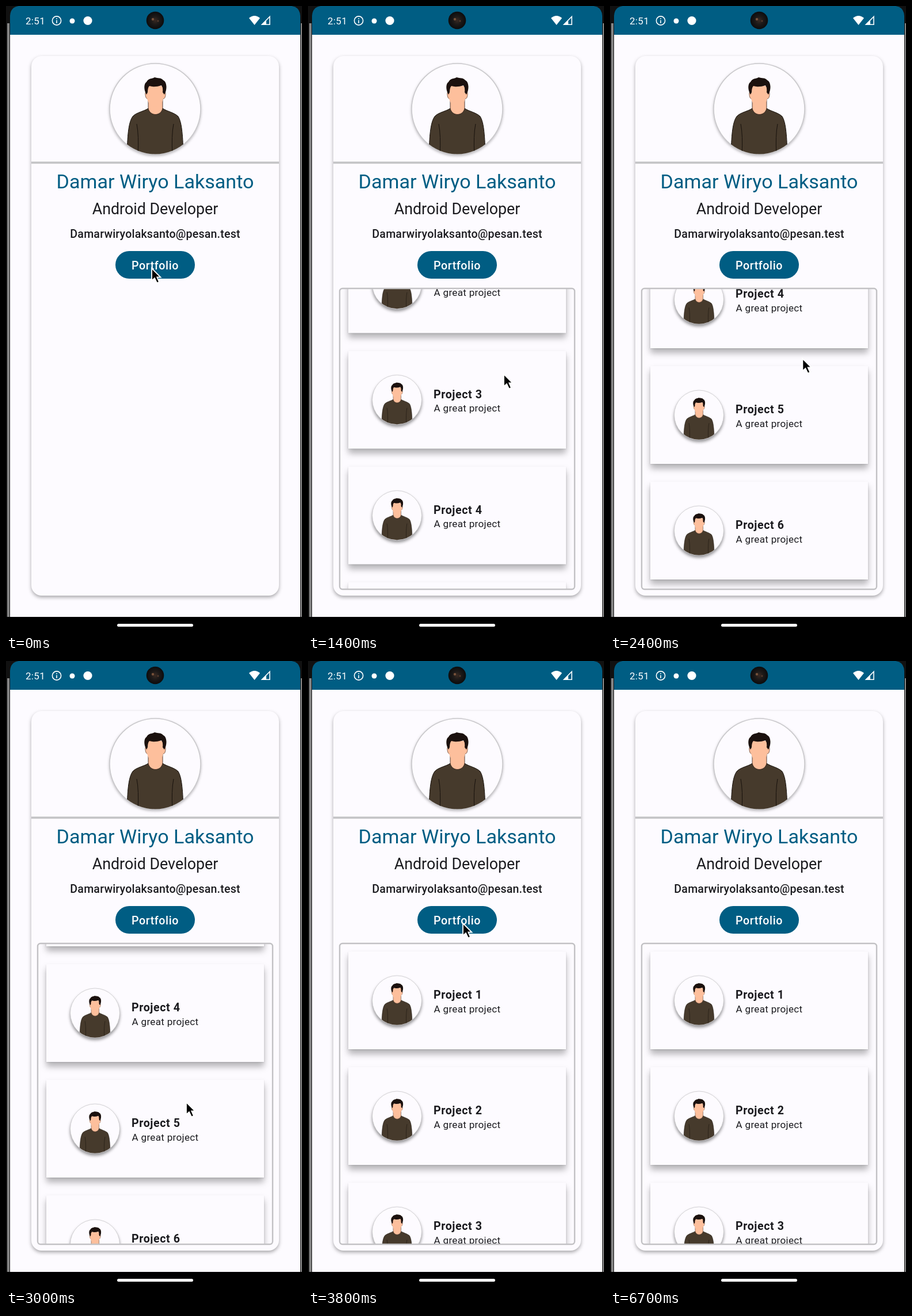
Recreate the animation shown at these times as an HTML page. Size 514x1090 px, loop 6800 ms.

```html
<!DOCTYPE html>
<html lang="en">
<head>
<meta charset="utf-8">
<title>Business card app</title>
<style>
  html, body { margin: 0; width: 100%; height: 100%; overflow: hidden; background: #000; }
  svg { display: block; width: 514px; height: 1090px; }
  text { font-family: Roboto, sans-serif; fill: #1b1b1f; }
  .mid { text-anchor: middle; }
  .name { font-size: 34.1px; fill: #005d83; }
  .role { font-size: 26.8px; }
  .mail { font-size: 19.6px; font-weight: 500; letter-spacing: .18px; }
  .label { font-size: 19.6px; font-weight: 500; letter-spacing: .6px; fill: #fff; }
  .title { font-size: 19.6px; font-weight: 700; letter-spacing: .6px; }
  .note { font-size: 17.1px; letter-spacing: .3px; }
  .clock { font-size: 17px; letter-spacing: .3px; fill: #fff; }
  .paper { fill: #fdfbff; }
  .card { filter: drop-shadow(0 3px 3px #0005); }
  .item { filter: drop-shadow(0 8px 6px #0004) drop-shadow(0 1px 1px #0002); }
  .disc { fill: #fdfbff; stroke: #c9c8cb; stroke-width: 1.5; filter: drop-shadow(0 2px 2px #0004); }
  .small .disc { filter: drop-shadow(0 7px 5px #0006); }
  .icon { fill: none; stroke: #fff; stroke-width: 1.6; }
</style>
</head>
<body>
<svg viewBox="0 0 514 1090">
  <defs>
    <clipPath id="round"><circle r="78.5"/></clipPath>
    <clipPath id="port"><rect x="56" y="492" width="406" height="521" rx="4"/></clipPath>
    <radialGradient id="lens">
      <stop offset="0" stop-color="#3a2a22"/>
      <stop offset=".45" stop-color="#1d1a19"/>
      <stop offset="1" stop-color="#0c0c0d"/>
    </radialGradient>
    <g id="person" clip-path="url(#round)" stroke-linejoin="round">
      <path fill="#463a2c" stroke="#17110c" d="M-49 80C-48 50-47 24-39 13C-33 6-19 4-12-1L13-1C20 4 33 6 40 13C47 24 48 50 49 80Z"/>
      <path fill="#fdbf9c" stroke="#2a1a12" stroke-width=".8" d="M-12-18V-1C-9 13 10 13 13-1V-18Z"/>
      <path fill="none" stroke="#17110c" d="M-32 26Q-28 46-30 80M32 26Q28 46 30 80"/>
      <path fill="#fdbf9c" stroke="#5a3828" stroke-width=".7" d="M-14-30Q-18-31-17-24Q-16-17-13-18M14-30Q19-31 18-24Q17-17 14-18"/>
      <path fill="#fdbf9c" d="M-14-40H14V-19C13-10 7-4 0-4C-7-4-13-10-14-19Z"/>
      <path fill="#1b110e" d="M-15-25C-20-33-20-44-15-47C-11-54-5-52-1-55C5-53 10-55 14-50C21-47 21-33 16-25L13-29Q14-37 11-41Q-1-37-10-40Q-13-37-13-29Z"/>
    </g>
  </defs>

  <!-- device frame and screen -->
  <rect width="514" height="1090" fill="#111"/>
  <path fill="#858585" d="M2 30H6V1068H2ZM512 30H514V1068H512Z"/>
  <rect class="paper" x="7" y="40" width="504" height="1022"/>
  <path fill="#005d83" d="M7 50V17Q8 2 22 0H496Q510 2 511 17V50Z"/>
  <rect y="1062" width="514" height="28"/>
  <rect x="193" y="1074" width="132" height="5" rx="2.5" fill="#fff"/>

  <!-- status bar -->
  <text class="clock" x="34" y="32">2:51</text>
  <g class="icon">
    <circle cx="88" cy="25.5" r="7.6"/>
    <path d="M88 24.5V30M88 21V22.8"/>
  </g>
  <circle cx="115" cy="26" r="4.5" fill="#fff"/>
  <circle cx="142" cy="25.5" r="7.6" fill="#fff"/>
  <circle cx="259" cy="25" r="15.3" fill="url(#lens)"/>
  <circle cx="255" cy="23" r="2.2" fill="#75513a"/>
  <circle cx="264" cy="26" r="1.5" fill="#573c2d"/>
  <path fill="#fff" d="M422 21Q431.500 13 441 21L431.500 33Z"/>
  <path fill="#fff" d="M443 33L452 24V33Z"/>
  <path class="icon" stroke-width="1.4" d="M458 18.500V32.300H444.500Z"/>

  <!-- profile card -->
  <rect class="paper card" x="44" y="87" width="430" height="938" rx="18"/>
  <g transform="translate(259 179)">
    <circle class="disc" r="79"/>
    <use href="#person"/>
  </g>
  <rect x="44" y="270.500" width="430" height="3.700" fill="#c4c4c6"/>
  <text class="mid name" x="259" y="317">Damar Wiryo Laksanto</text>
  <text class="mid role" x="259" y="361.500">Android Developer</text>
  <text class="mid mail" x="259" y="402.500">Damarwiryolaksanto@pesan.test</text>
  <rect x="190" y="426" width="138" height="48" rx="24" fill="#005d83"/>
  <text class="mid label" x="259" y="457.500">Portfolio</text>

  <g id="panel">
    <g clip-path="url(#port)"><g id="list"></g></g>
    <rect x="55" y="491" width="408" height="523" rx="5" fill="none" stroke="#c2c1c4" stroke-width="2.400"/>
  </g>

  <path id="cursor" stroke="#fff" stroke-width="1.800" d="M0 0V21.500L5 17L9 25.500L13 23.800L9.300 15.500H15.500Z"/>
</svg>
<script>
  const $ = id => document.getElementById(id);
  const LOOP = 6800, STEP = 100;

  // [time, x, y] of the pointer tip
  const pointer = [
    [0, 253, 456], [200, 253, 456], [700, 330, 735], [800, 330, 735], [1000, 327, 633],
    [1100, 325, 565], [1600, 350, 690], [1700, 355, 685], [1900, 373, 452], [2300, 340, 600],
    [2800, 312, 665], [3000, 313, 767], [3200, 312, 850], [3500, 290, 600], [3800, 269, 456],
    [4900, 262, 447], [5300, 262, 447], [5600, 530, 430]
  ];
  // [time, list offset]
  const scroll = [
    [800, 0], [1000, 97], [1100, 170], [1300, 280], [1500, 335], [1700, 345], [1900, 566],
    [2200, 683], [2800, 683], [3000, 581], [3200, 430], [3500, 60], [3600, 0]
  ];

  // Linear value of a track's column at time t, held at both ends
  function at(track, t, col) {
    const i = track.findIndex(k => k[0] > t);
    if (i < 0) return track[track.length - 1][col];
    if (i === 0) return track[0][col];
    const a = track[i - 1], b = track[i];
    return a[col] + (b[col] - a[col]) * (t - a[0]) / (b[0] - a[0]);
  }

  const item = (_, i) => `
    <g transform="translate(0 ${505 + 201 * i})">
      <rect class="paper item" x="70" width="378" height="170"/>
      <g class="small" transform="translate(154.500 85) scale(.544)">
        <circle class="disc" r="79"/><use href="#person"/>
      </g>
      <text class="title" x="218" y="82">Project ${i + 1}</text>
      <text class="note" x="218.500" y="105.500">A great project</text>
    </g>`;
  $('list').innerHTML = Array.from({ length: 6 }, item).join('');

  function draw(now) {
    const t = Math.floor(now % LOOP / STEP) * STEP;
    const open = t >= 200 && t < 4000 || t >= 5200;
    $('panel').setAttribute('visibility', open ? 'visible' : 'hidden');
    $('list').setAttribute('transform', `translate(0 ${-at(scroll, t, 1)})`);
    $('cursor').setAttribute('transform', `translate(${at(pointer, t, 1)} ${at(pointer, t, 2)})`);
  }

  const start = performance.now();
  function tick() {
    draw(performance.now() - start);
    requestAnimationFrame(tick);
  }
  tick();
</script>
</body>
</html>
```
